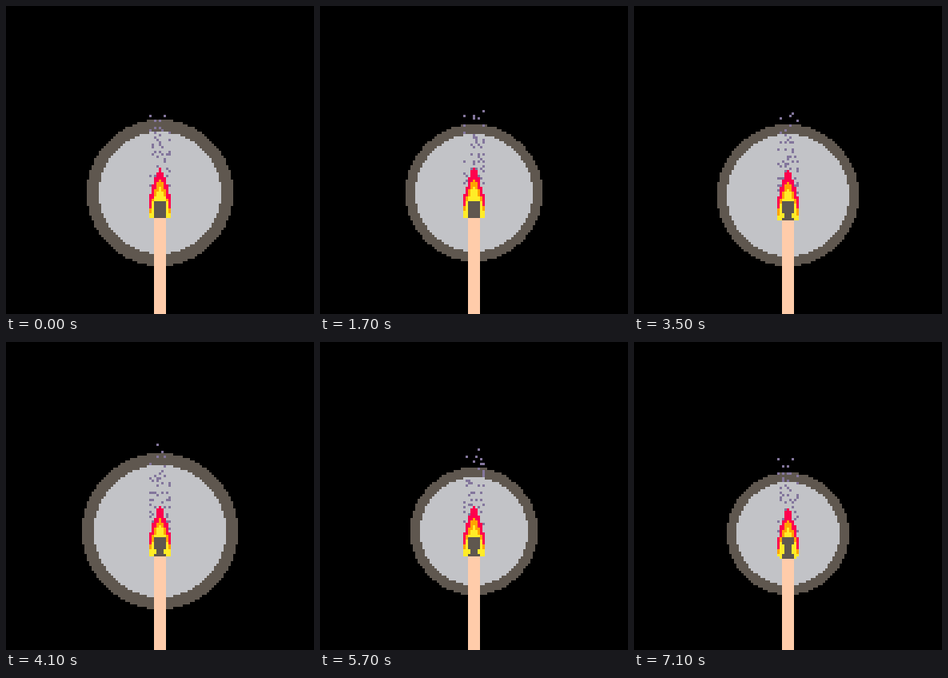
These frames come from a looping animation (385 px wide and 385 px high, 7200 ms). An HTML page with a canvas:

```html
<!DOCTYPE html>
<html lang="en">
<head>
<meta charset="utf-8">
<title>Burning match</title>
<style>
  html, body { margin: 0; height: 100%; overflow: hidden; background: #000; }
  canvas { display: block; width: 100%; height: 100%; image-rendering: pixelated; }
</style>
</head>
<body>
<canvas id="stage" width="385" height="385"></canvas>
<script>
const ctx = document.getElementById('stage').getContext('2d');
const STEP = 100, STEPS = 72, CX = 64;
const COLOR = {
  rim: '#5f574f', glow: '#c2c3c7', wood: '#ffccaa', smoke: '#83769c',
  red: '#ff004d', orange: '#ffa300', yellow: '#ffec27'
};

// [step, radius] of the flickering glow
const GLOW = [[0, 30], [5, 31], [9, 29], [13, 31], [17, 28], [21, 30], [25, 29], [27, 33],
  [29, 31], [35, 29], [38, 31], [43, 32], [47, 26], [52, 28], [57, 26], [61, 28],
  [64, 25], [67, 28], [71, 25], [72, 30]];

// Rows below the tip at which each layer grows one cell wider per side
const FLAME = [
  ['red', [0, 1, 4, 7, 11]],
  ['orange', [5, 6, 9, 12, 16]],
  ['yellow', [8, 9, 12, 14, 18]]
];

const random = (a, b = 0) => {
  const v = Math.sin(a * 127.1 + b * 311.7 + 4.3) * 43758.5453;
  return v - Math.floor(v);
};

function cells(color, x, y, w = 1, h = 1) {
  ctx.fillStyle = COLOR[color];
  ctx.fillRect(3 * x - 1, 3 * y + 1, 3 * w, 3 * h);
}

const row = (color, y, half) => cells(color, CX - half, y, 2 * half + 1);

// Same cells as a Bresenham circle
function disc(color, cy, r) {
  for (let dy = -r; dy <= r; dy++) {
    let half = r;
    while (half * half + dy * dy - Math.max(half, Math.abs(dy)) >= r * r) half--;
    row(color, cy + dy, half);
  }
}

function glowRadius(step) {
  const i = GLOW.findIndex(key => key[0] > step);
  const [s0, r0] = GLOW[i - 1], [s1, r1] = GLOW[i];
  const u = (step - s0) / (s1 - s0);
  const flicker = (random(step, 7) - 0.5) * 8 * u * (1 - u);
  return Math.round(r0 + (r1 - r0) * u + flicker);
}

function drawSmoke(step, burn) {
  const life = 24;
  for (let i = 0; i < 64; i++) {
    const clock = step + STEPS + Math.floor(random(i, 1) * life);
    const age = clock % life;
    const cycle = Math.floor(clock / life) % 3;
    if (age > life * (0.55 + 0.45 * random(i, cycle + 2))) continue;
    const x = CX - 4 + Math.floor(random(i, cycle + 5) * 9);
    cells('smoke', x, 76 + burn - Math.floor(age * 1.5 + random(i, 9)));
  }
}

function drawFlame(step, burn) {
  const tip = 67 + burn;
  FLAME.forEach(([color, growth], layer) => {
    const edges = growth.map((at, i) => at + (i && random(step, layer * 9 + i) > 0.8 ? 1 : 0));
    for (let y = 0; y < 21; y++) {
      let half = edges.filter(at => at <= y).length - 1;
      if (y === 20 && burn > 1) half = Math.min(half, 3);
      if (half >= 0) row(color, tip + y, half);
    }
  });
}

function drawHead(burn) {
  const bottom = 88 + burn;
  for (let y = 81; y < bottom; y++) {
    const narrow = y < 88 && y >= 88 - 2 * burn;
    row('rim', y, narrow ? 1 : 2);
  }
}

function draw(step) {
  const burn = step < 22 ? 0 : step < 61 ? 1 : 2;
  const r = glowRadius(step);
  ctx.fillStyle = '#000';
  ctx.fillRect(0, 0, 385, 385);
  disc('rim', 77 + burn, r);
  disc('glow', 77 + burn, Math.round(r * 0.849));
  drawSmoke(step, burn);
  cells('wood', CX - 2, 88 + burn, 5, 40 - burn);
  drawFlame(step, burn);
  drawHead(burn);
}

function tick() {
  draw(Math.floor(performance.now() / STEP) % STEPS);
  requestAnimationFrame(tick);
}
tick();
</script>
</body>
</html>
```
